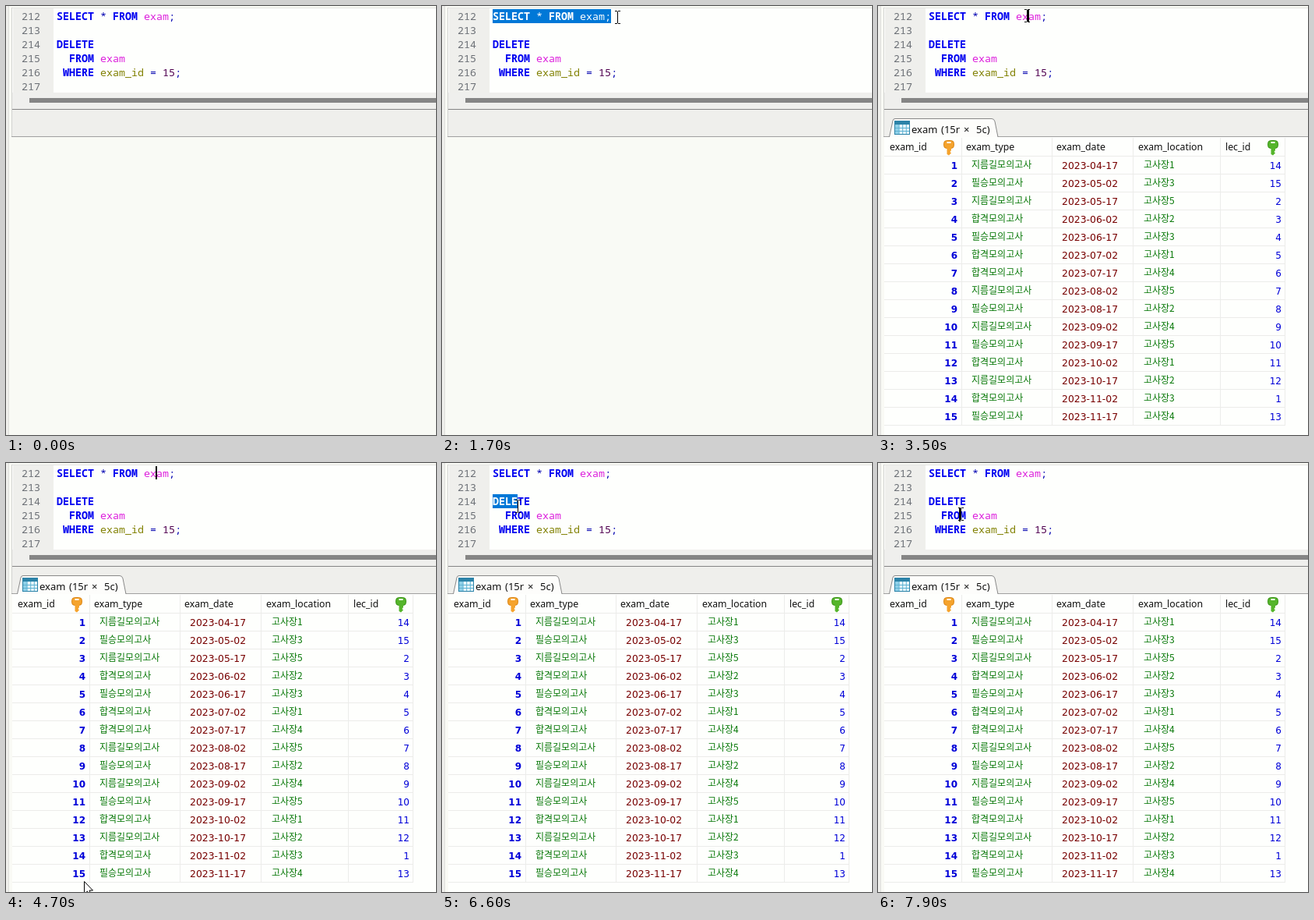
An HTML page with a canvas that plays this animation: 552x550 px, repeating every 8 s.

```html
<!DOCTYPE html>
<html lang="ko">
<head>
<meta charset="utf-8">
<style>
html, body { margin: 0; width: 552px; height: 550px; overflow: hidden; background: #f9faf5; }
canvas { display: block; }
</style>
</head>
<body>
<canvas id="stage" width="552" height="550"></canvas>
<script>
const ctx = document.getElementById('stage').getContext('2d');
const LOOP = 8000, CELL = 8, LINE = 18, LEFT = 65, TOP = 4;
const MONO = '13.33px "Noto Sans Mono", "DejaVu Sans Mono", monospace';
const UI = '"Noto Sans", "Open Sans", sans-serif';
const NUM = '"DejaVu Sans", sans-serif';
const KR = '12px "Noto Sans CJK KR", "Noto Sans CJK", sans-serif';

const BLUE = '#0000f0', PINK = '#dc1edc', OLIVE = '#808000', NAVY = '#0000b0', PLUM = '#500050';
// line, column, text, colour, bold
const TOKENS = [
  [0, 0, 'SELECT', BLUE, 1], [0, 7, '*', NAVY], [0, 9, 'FROM', BLUE, 1],
  [0, 14, 'exam', PINK], [0, 18, ';', NAVY],
  [2, 0, 'DELETE', BLUE, 1],
  [3, 2, 'FROM', BLUE, 1], [3, 7, 'exam', PINK],
  [4, 1, 'WHERE', BLUE, 1], [4, 7, 'exam_id', OLIVE], [4, 15, '=', NAVY],
  [4, 17, '15', PLUM], [4, 19, ';', NAVY]
];
const LENGTHS = [19, 0, 6, 11, 20, 0];

const TYPES = ['지름길모의고사', '필승모의고사', '합격모의고사'];
const typeOrder = '010212201012021';
const rooms = '135231452451234';
const lectures = [14, 15, 2, 3, 4, 5, 6, 7, 8, 9, 10, 11, 12, 1, 13];
const EDGES = [107, 223, 327, 439, 522];

// time, x, y of the pointer
const PATH = [
  [200, 252, -12], [450, 205, 60], [700, 90, 88], [900, 40, 60], [1200, 66, 14],
  [1300, 66, 14], [1650, 225, 14], [1950, 225, 14], [2500, 207, 40], [2900, 195, 20],
  [3200, 191, 12], [4000, 191, 12], [4400, 150, 290], [4650, 100, 536], [4900, 100, 536],
  [5250, 118, 522], [5600, 100, 300], [5900, 82, 120], [6200, 66, 52], [6350, 66, 52],
  [6600, 97, 55], [6900, 150, 68], [7150, 228, 77], [7550, 228, 77], [7800, 106, 65], [8000, 106, 65]
];

function pointer(t) {
  if (t < PATH[0][0]) return null;
  const i = Math.max(1, PATH.findIndex(p => p[0] > t));
  const [t0, x0, y0] = PATH[i - 1], [t1, x1, y1] = PATH[i];
  const u = (t - t0) / (t1 - t0), e = u * u * (3 - 2 * u);
  return { x: x0 + (x1 - x0) * e, y: y0 + (y1 - y0) * e };
}

function rect(x, y, w, h, color) {
  ctx.fillStyle = color;
  ctx.fillRect(x, y, w, h);
}

function text(s, x, y, font, color, align = 'left') {
  ctx.font = font;
  ctx.fillStyle = color;
  ctx.textAlign = align;
  ctx.fillText(s, x, y);
}

function code(color) {
  for (const [line, col, s, own, bold] of TOKENS) {
    text(s, LEFT + col * CELL, TOP + 14 + line * LINE, (bold ? 'bold ' : '') + MONO, color || own);
  }
}

function selection(t) {
  const p = pointer(t);
  if (!p) return [];
  const colAt = x => Math.max(0, Math.round((x - LEFT) / CELL));
  if (t >= 1300 && t < 3300) {
    const end = t < 1650 ? Math.min(19, colAt(p.x)) : 19;
    return [[LEFT, TOP, end * CELL, LINE]];
  }
  if (t >= 6350 && t < 7700) {
    const row = t < 7150 ? Math.max(2, Math.min(4, Math.floor((p.y - TOP) / LINE))) : 4;
    const end = t < 7150 ? Math.min(LENGTHS[row], colAt(p.x)) : 20;
    const boxes = [];
    for (let r = 2; r <= row; r++) {
      boxes.push([LEFT, TOP + r * LINE, r < row ? 552 - LEFT : end * CELL, LINE]);
    }
    return boxes;
  }
  return [];
}

function editor(t) {
  rect(8, 2, 544, 130, '#fefffd');
  rect(8, 2, 544, 1, '#e4e4e2');
  rect(9, 3, 52, 108, '#efefec');
  rect(8, 111, 544, 21, '#efefed');
  rect(30, 118, 522, 6, '#858585');
  for (let i = 0; i < 6; i++) text(212 + i, 20, TOP + 14 + i * LINE, MONO, '#6c7076');
  code();
  const boxes = selection(t);
  if (boxes.length) {
    ctx.save();
    ctx.beginPath();
    boxes.forEach(b => ctx.rect(...b));
    ctx.clip();
    rect(LEFT, 0, 552, 111, '#0078d7');
    code('#fff');
    ctx.restore();
  }
  caret(t, 3300, 6350, 193, TOP);
  caret(t, 7700, LOOP, 105, TOP + 3 * LINE);
}

function caret(t, from, to, x, y) {
  if (t >= from && t < to && (t - from) % 1060 < 530) rect(x - 1, y, 2, LINE - 1, '#000');
}

function key(x, color, edge) {
  ctx.fillStyle = color;
  ctx.strokeStyle = edge;
  ctx.lineWidth = 1;
  ctx.beginPath();
  ctx.roundRect(x - 6.5, 172.5, 13, 10, 4);
  ctx.fill();
  ctx.stroke();
  ctx.beginPath();
  ctx.moveTo(x - 2.5, 182);
  ctx.lineTo(x - 2.5, 190);
  ctx.lineTo(x, 191.5);
  ctx.lineTo(x + 3, 188.5);
  ctx.lineTo(x + 1.5, 187);
  ctx.lineTo(x + 3, 185);
  ctx.lineTo(x + 3, 182);
  ctx.fill();
  rect(x - 2.5, 174, 5, 2, '#fff');
}

function tab() {
  ctx.beginPath();
  ctx.moveTo(14.5, 168);
  ctx.lineTo(19, 147);
  ctx.quadraticCurveTo(19.5, 144.5, 22, 144.5);
  ctx.lineTo(146, 144.5);
  ctx.quadraticCurveTo(149, 144.5, 150, 148);
  ctx.lineTo(154, 168);
  ctx.fillStyle = '#fdfdfb';
  ctx.fill();
  ctx.strokeStyle = '#898989';
  ctx.lineWidth = 1;
  ctx.stroke();

  rect(21, 147, 20, 18, '#2c83a8');
  rect(22, 152, 18, 12, '#e8f7fc');
  rect(22, 152, 5, 12, '#8fd0e8');
  for (let i = 1; i < 4; i++) rect(22 + i * 4.6, 152, 1, 12, '#5fb2d2');
  for (let i = 1; i < 3; i++) rect(22, 152 + i * 4, 18, 1, '#5fb2d2');

  const font = '13px ' + UI;
  text('exam', 43, 163, font, '#111');
  text('(15r', 81, 163, font, '#111');
  text('×', 110, 163, font, '#111');
  text('5c)', 126, 163, font, '#111');
}

function table() {
  rect(8, 168, 544, 382, '#fefffd');
  tab();
  for (const x of EDGES) rect(x, 169, 1, 369, '#ececea');
  for (let i = 0; i <= 15; i++) rect(8, 192 + i * 23, 515, 1, '#ececea');

  const names = ['exam_id', 'exam_type', 'exam_date', 'exam_location', 'lec_id'];
  [15, 113, 229, 334, 446].forEach((x, i) => text(names[i], x, 185, '12.3px ' + UI, '#111'));
  key(91, '#f5a32c', '#d98516');
  key(507, '#55b52b', '#399217');

  for (let i = 0; i < 15; i++) {
    const y = 209 + i * 23;
    const month = String(4 + ((i + 1) >> 1)).padStart(2, '0');
    text(i + 1, 102, y, 'bold 12px ' + NUM, '#0000d8', 'right');
    text(TYPES[typeOrder[i]], 120, y - 1, KR, '#087808');
    text('2023-' + month + (i % 2 ? '-02' : '-17'), 236, y, '12.4px ' + NUM, '#780000');
    text('고사장' + rooms[i], 341, y - 1, KR, '#087808');
    text(lectures[i], 518, y, '12px ' + NUM, '#0000d8', 'right');
  }
}

function drawPointer(p) {
  ctx.save();
  ctx.translate(Math.round(p.x), Math.round(p.y));
  if (p.x > 61 && p.y < 111) {
    rect(0, -7, 1, 15, '#000');
    for (const y of [-8, 8]) {
      rect(-3, y, 3, 1, '#000');
      rect(1, y, 3, 1, '#000');
    }
  } else {
    const tip = [[0, 0], [0, 16], [4, 12.5], [6.5, 18], [9, 17], [6.5, 11.5], [11, 11.5]];
    ctx.beginPath();
    tip.forEach(([x, y]) => ctx.lineTo(x + 0.5, y + 0.5));
    ctx.closePath();
    ctx.fillStyle = '#fff';
    ctx.fill();
    ctx.strokeStyle = '#000';
    ctx.lineWidth = 1;
    ctx.stroke();
  }
  ctx.restore();
}

function draw(t) {
  rect(0, 0, 552, 550, '#f9faf5');
  rect(0, 0, 3, 550, '#efefec');
  rect(3, 0, 1, 550, '#dededb');
  editor(t);
  rect(7, 2, 1, 166, '#d2d2d0');
  rect(8, 132, 544, 1, '#858585');
  rect(8, 133, 544, 34, '#efefec');
  rect(7, 167, 545, 1, '#a0a0a0');
  if (t >= 3100) table();
  const p = pointer(t);
  if (p) drawPointer(p);
}

function frame() {
  draw(performance.now() % LOOP);
  requestAnimationFrame(frame);
}
frame();
</script>
</body>
</html>
```
